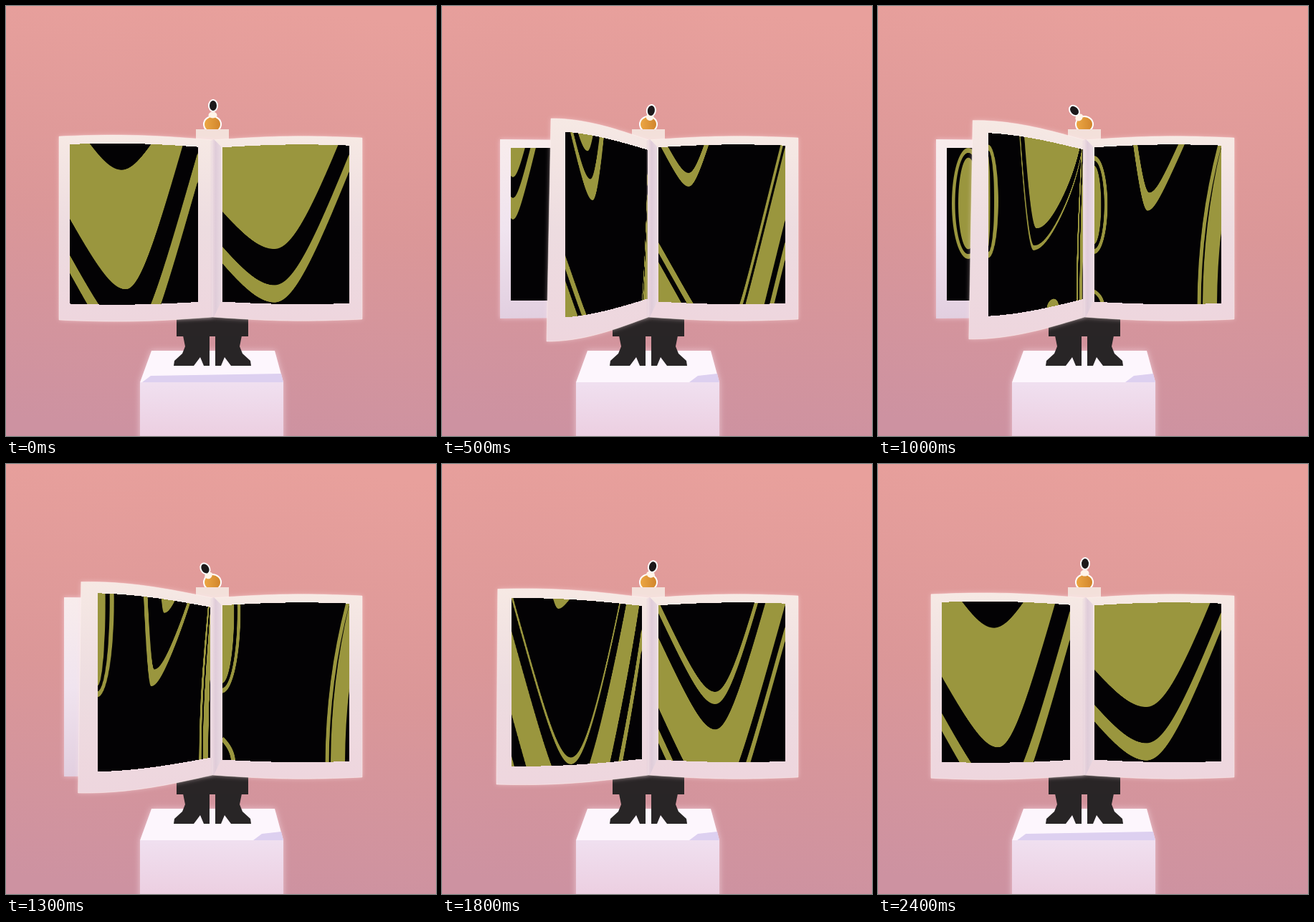
These frames come from a looping animation (600 by 600 pixels, 2.5 s). An HTML page with a canvas:

```html
<!DOCTYPE html>
<html lang="en">
<head>
<meta charset="utf-8">
<title>Reading bird</title>
<style>
html, body { margin: 0; width: 100%; height: 100%; overflow: hidden; background: #d99698; }
canvas { display: block; width: 600px; height: 600px; }
</style>
</head>
<body>
<canvas id="stage" width="600" height="600"></canvas>
<script>
const ctx = document.getElementById('stage').getContext('2d');
const OLIVE = '#9a963e', BLACK = '#030204';
const LOOP = 2500, STEP = 100, SPINE = 288;
const ART_W = 178, ART_H = 220;
let pen = ctx;

function poly(fill, ...n) {
  pen.beginPath();
  for (let i = 0; i < n.length; i += 2) pen.lineTo(n[i], n[i + 1]);
  pen.closePath();
  pen.fillStyle = fill;
  pen.fill();
}

function oval(fill, x, y, rx, ry, turn = 0) {
  pen.beginPath();
  pen.ellipse(x, y, rx, ry, turn, 0, 7);
  pen.fillStyle = fill;
  pen.fill();
}

// Nested hyperbolas, deepest first, in alternating colours.
function valley({ x, round, left, right, flat = 0, drift = 0, inks = [OLIVE, BLACK] }, ...depths) {
  depths.forEach((depth, i) => {
    pen.beginPath();
    pen.moveTo(-2, -9);
    for (let px = -2; px <= ART_W + 2; px++) {
      const off = px - x - drift * depth;
      const arm = Math.max(0, Math.abs(off) - flat / 2);
      const rise = (off < 0 ? left : right) * (Math.hypot(arm, round) - round);
      pen.lineTo(px, Math.max(-9, depth - rise));
    }
    pen.lineTo(ART_W + 2, -9);
    pen.fillStyle = inks[i % 2];
    pen.fill();
  });
}

function loop(x, y, rx, ry) {
  for (let i = 0; i < 3; i++) oval(i % 2 ? BLACK : OLIVE, x, y, rx - 4.5 * i, ry - 7 * i);
}

// A stripe that bends from its top place down into the vertical.
function streak(top, bottom, width, y = -5) {
  pen.beginPath();
  pen.moveTo(top, y);
  pen.quadraticCurveTo(bottom, (y + ART_H) / 2, bottom, ART_H + 5);
  pen.strokeStyle = OLIVE;
  pen.lineWidth = width;
  pen.stroke();
}

function panel(paint) {
  const c = document.createElement('canvas');
  c.width = ART_W * 2;
  c.height = ART_H * 2;
  pen = c.getContext('2d');
  pen.scale(2, 2);
  pen.fillStyle = BLACK;
  pen.fillRect(0, 0, ART_W, ART_H);
  paint();
  pen = ctx;
  return c;
}

const spreads = [
  { left: panel(() => {
      valley({ x: 58, round: 35, left: 1.92, right: 3.87, drift: .1 }, 290, 260, 199);
      valley({ x: 72, round: 35, left: 1.7, right: 1.9, inks: [BLACK] }, 36);
    }),
    right: panel(() => valley({ x: 73, round: 50, left: 1.38, right: 2.75 }, 218, 194, 144)),
    back: panel(() => oval(OLIVE, 25, 119, 60, 83)) },
  { left: panel(() => {
      valley({ x: 86, flat: 92, round: 10, left: 3, right: 6 }, 500, 270, 256, 240);
      valley({ x: 25.5, round: 14, left: 4.4, right: 10, drift: .12 }, 80, 54, 20);
    }),
    right: panel(() => {
      valley({ x: 85.5, flat: 35, round: 10, left: 1.8, right: 4.07 }, 425, 400, 370, 268, 255, 240);
      valley({ x: 43, round: 14, left: 2.1, right: 3.3 }, 57, 38);
    }),
    back: panel(() => valley({ x: 3, round: 10, left: 4.4, right: 4.4 }, 103, 72, 42)) },
  { left: panel(() => {
      streak(170, 146, 6);
      streak(186, 164, 16);
      valley({ x: 77, round: 25, left: 22, right: 1.54, drift: -.15 }, 143, 137, 115);
      loop(0, 82, 11, 68);
      oval(OLIVE, 87, 222, 11, 12);
    }),
    right: panel(() => {
      streak(177, 147, 5);
      streak(190, 162, 20);
      valley({ x: 84, round: 14, left: 8.75, right: 2.3, drift: -.1 }, 91, 66);
      loop(0, 82, 19, 70);
      streak(0, 12, 5, 205);
    }),
    back: panel(() => loop(30, 80, 23, 80)) },
  { left: panel(() => {
      streak(172, 144, 6);
      streak(190, 160, 18);
      valley({ x: 81, round: 14, left: 40, right: 2.37, drift: -.18 }, 115, 93, 18);
      loop(0, 10, 17, 118);
    }),
    right: panel(() => {
      streak(177, 147, 5);
      streak(190, 162, 20);
      loop(0, 10, 26, 115);
      streak(0, 16, 6, 190);
    }) },
  { left: panel(() => {
      valley({ x: 70, round: 28, left: 4.6, right: 4.7 }, 455, 425, 370, 261, 219, 210);
      valley({ x: 54, round: 8, left: 6, right: 1.6 }, 13);
    }),
    right: panel(() => valley({ x: 80, round: 30, left: 2.35, right: 3.78 }, 325, 305, 275, 175, 140, 123)) }
];

// Smooth interpolation through [time, value] pairs.
function track(t, keys) {
  const i = keys.findIndex(k => k[0] > t);
  const [t0, a] = keys[i - 1], [t1, b] = keys[i];
  return a + (b - a) * (1 - Math.cos(Math.PI * (t - t0) / (t1 - t0))) / 2;
}

const swayKeys = [[0, 0], [300, 7], [1000, -15], [1500, -9], [1800, 5], [2400, 0], [2501, 0]];

// The page springs up, then sinks slowly back.
function liftAt(t) {
  const up = Math.sin(Math.min(1, t / 400) * Math.PI / 2);
  const down = (1 + Math.cos(Math.max(0, t - 600) / 1900 * Math.PI)) / 2;
  return Math.min(up, down);
}

function ramp(x0, y0, x1, y1, ...colors) {
  const g = ctx.createLinearGradient(x0, y0, x1, y1);
  colors.forEach((c, i) => g.addColorStop(i / (colors.length - 1), c));
  return g;
}

function glow(color, blur) {
  ctx.shadowColor = color;
  ctx.shadowBlur = blur;
}

function page(art, dir, lift) {
  const width = dir < 0 ? 214 - 75 * lift ** 2.7 : 209;
  const power = 1 + 1.05 * lift;
  const edgeTop = dir < 0 ? 182 - 25 * lift : 184;
  const edgeBottom = dir < 0 ? 438 + 30 * lift : 437;
  const [q0, q1] = dir < 0 ? [.094, .93 - .015 * lift] : [.065, .915];
  const span = p => {
    const rise = Math.sin(p * Math.PI / 2), bulge = 3 * (1 - lift) * Math.sin(p * Math.PI);
    return [187 + (edgeTop - 187) * rise - bulge, 434 + (edgeBottom - 434) * rise + bulge];
  };
  const xAt = p => SPINE + dir * width * p;

  ctx.beginPath();
  for (let p = 0; p <= 1.001; p += .05) ctx.lineTo(xAt(p) + 3 * lift * p, span(p)[0]);
  for (let p = 1; p >= -.001; p -= .05) ctx.lineTo(xAt(p) - 3 * lift * p, span(p)[1]);
  ctx.closePath();
  ctx.fillStyle = ramp(0, edgeTop, 0, edgeBottom, '#f6e9e4', '#eddce0', '#eed6de');
  glow('rgba(255,225,230,.5)', 6);
  ctx.fill();
  glow('transparent', 0);
  ctx.strokeStyle = 'rgba(255,244,240,.5)';
  ctx.lineWidth = 1;
  ctx.stroke();

  const ends = [xAt(q0 ** power), xAt(q1 ** power)].sort((a, b) => a - b).map(Math.round);
  const inset = .045 + .012 * lift, tall = .865 - .027 * lift;
  for (let x = ends[0]; x < ends[1]; x++) {
    const p = Math.abs(x + .5 - SPINE) / width;
    const f = (p ** (1 / power) - q0) / (q1 - q0);
    const col = Math.max(0, Math.min(.995, dir < 0 ? 1 - f : f)) * ART_W * 2;
    const [top, bottom] = span(p), h = bottom - top;
    ctx.drawImage(art, col, 0, 1, ART_H * 2, x, top + inset * h, 1, tall * h);
  }
}

function scenery(lift) {
  ctx.fillStyle = ramp(330, 0, 270, 600, '#e8a09c', '#db9798', '#cd92a1');
  ctx.fillRect(0, 0, 600, 600);

  glow('rgba(255,235,245,.6)', 9);
  poly('#fdf6fd', 203, 481, 375, 481, 387, 525, 387, 610, 187, 610, 187, 525);
  glow('transparent', 0);
  const edge = 190 + 155 * Math.min(1, lift * 4);
  poly('#ddd0f0', edge, 525, edge + 12, 516, 384, 513, 387, 525);
  poly(ramp(0, 525, 0, 600, '#f0e0f0', '#eccfe1'), 187, 525, 387, 525, 387, 600, 187, 600);
}

function boot(flip) {
  ctx.save();
  ctx.translate(SPINE, 0);
  ctx.scale(flip, 1);
  poly('#282526', 4, 460, 41, 460, 38, 475, 42, 485, 53, 495, 54, 502,
    26, 502, 17, 490, 12, 502, 4, 502);
  ctx.restore();
}

function bird(t, lift) {
  const sway = track(t, swayKeys);
  const x = 289 + sway, y = 139 + Math.min(7, lift * 14);
  const turn = sway * .05;
  for (const rim of [2, 0]) {
    oval(rim ? '#fff' : ramp(276, 0, 300, 0, '#eda845', '#d0842b'), 288, 165, 11 + rim, 10 + rim);
    oval('#fff3e8', (x + 288) / 2, (y + 166) / 2, 5 + rim / 2, 4 + rim / 2, turn);
    oval(rim ? '#fff' : '#1d191b', x, y, 5 + rim, 7 + rim, turn);
  }
}

function draw(t) {
  const lift = liftAt(t);
  const spread = spreads[Math.floor(Math.max(0, t - 100) / 400) % spreads.length];
  scenery(lift);
  bird(t, lift);
  poly('#f3e0da', 265, 172, 311, 172, 311, 190, 265, 190);
  poly('#292526', 238, 430, 338, 430, 338, 461, 238, 461);
  boot(1);
  boot(-1);

  glow('rgba(255,225,240,.6)', 6);
  poly(ramp(0, 186, 0, 436, '#f8ecec', '#f0e4ef', '#e2cfe0'), 81, 186, SPINE, 188, SPINE, 434, 81, 436);
  glow('transparent', 0);
  if (spread.back) ctx.drawImage(spread.back, 96, 198, ART_W, 213);
  page(spread.right, 1, 0);
  page(spread.left, -1, lift);
  poly(ramp(284, 0, 301, 0, 'rgba(225,205,218,0)', '#dfccd9', '#eadae2'),
    285, 188, 290, 186, 300, 196, 300, 413, 290, 434, 285, 434);
}

function tick() {
  const t = performance.now() % LOOP;
  draw(Math.floor(t / STEP) * STEP);
  requestAnimationFrame(tick);
}
tick();
</script>
</body>
</html>
```
